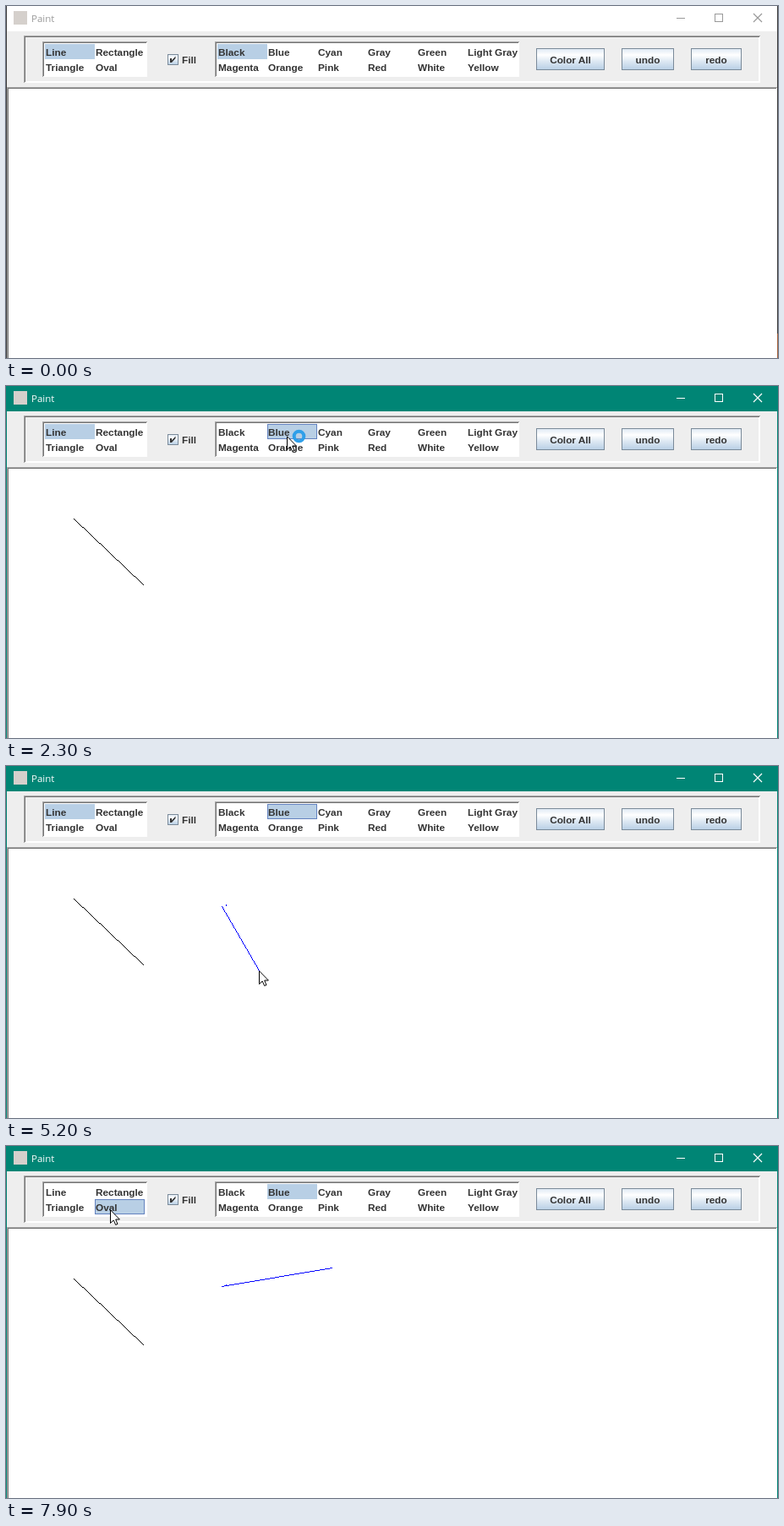
Write an HTML page that moves like this. It is 913 px wide and 417 px high and loops after 8 s.

```html
<!DOCTYPE html>
<html lang="en">
<head>
<meta charset="utf-8">
<title>Paint</title>
<style>
  html, body { margin: 0; width: 100%; height: 100%; overflow: hidden; background: #fff; }
  svg { display: block; width: 913px; height: 417px; --bar: #fff; --edge: #3c3c3c; --caption: #999; }
  svg.active { --bar: #008575; --edge: #008575; --caption: #fff; }
  #ui { font: bold 11.8px "Liberation Sans", Arial, sans-serif; fill: #333; }
  #title { font: 11.5px "Open Sans", sans-serif; fill: var(--caption); }
  .crisp { shape-rendering: crispEdges; }
  .mid { text-anchor: middle; }
</style>
</head>
<body>
<svg id="stage" viewBox="0 0 913 417">
  <defs>
    <linearGradient id="steel" x1="0" y1="0" x2="0" y2="1">
      <stop stop-color="#dde8f3"/>
      <stop offset=".3" stop-color="#fff"/>
      <stop offset=".6" stop-color="#dde8f3"/>
      <stop offset="1" stop-color="#b8cfe5"/>
    </linearGradient>
  </defs>

  <rect width="913" height="417" fill="#eee"/>
  <rect width="913" height="30" style="fill:var(--bar)"/>
  <rect x="9" y="6" width="16" height="16" fill="#d5d0cc"/>
  <text id="title" x="30" y="19">Paint</text>
  <g fill="none" style="stroke:var(--caption)">
    <path class="crisp" d="M793 14.5h10M838.5 9.5h9v9h-9z"/>
    <path stroke-width="1.2" d="M884 9l10 10m0-10l-10 10"/>
  </g>

  <g id="frames" class="crisp"></g>
  <path class="crisp" style="fill:var(--edge)" d="M0 0h1v417h-1zM912 0h1v417h-1z"/>
  <rect id="desk" x="912" y="388" width="1" height="29" fill="#a5623c"/>
  <g class="crisp" fill="#b8cfe5">
    <rect id="shapeSel" width="58" height="17"/>
    <rect id="colorSel" width="58" height="17"/>
  </g>
  <g id="ui"></g>
  <path d="M194 62v5h2l4.5-5v-2.5l-4.5 5v-2.5z" fill="#333"/>

  <g class="crisp">
    <path id="black"/>
    <path id="dot" fill="#00f"/>
    <path id="blue" fill="#00f"/>
  </g>
  <g id="cursor">
    <path d="M.5 .8V16.4L4.2 12.9 6.7 18.4 9 17.4 6.7 12H11.4Z" fill="#fff" stroke="#000"/>
    <circle id="busy" cx="14.5" cy=".5" r="5.8" fill="none" stroke="#2f9fe9" stroke-width="4"/>
  </g>
</svg>
<script>
const LOOP = 8000, STEP = 100;
const CELL_W = 59, CELL_H = 18;
const $ = id => document.getElementById(id);

const frames = $('frames'), ui = $('ui');
const add = (parent, markup) => parent.insertAdjacentHTML('beforeend', markup);
const label = (text, x, y, cls = '') => add(ui, `<text class="${cls}" x="${x}" y="${y}">${text}</text>`);

function bevel(x, y, w, h, fill) {
  const corner = (d, color) =>
    `<path fill="none" stroke="${color}" d="M${x + d + .5} ${y + h - d}V${y + d + .5}H${x + w - d}"/>`;
  add(frames, `<rect x="${x}" y="${y}" width="${w}" height="${h}" fill="#fff"/>
    <rect x="${x + 2}" y="${y + 2}" width="${w - 4}" height="${h - 4}" fill="${fill}"/>
    ${corner(0, '#a6a6a6')}${corner(1, '#747474')}`);
}

function list(x, y, rows) {
  bevel(x - 3, y - 3, rows[0].length * CELL_W + 6, rows.length * CELL_H + 6, '#fff');
  rows.forEach((row, r) => row.forEach((name, c) =>
    label(name, x + c * CELL_W + 1, y + r * CELL_H + 14)));
}

function steelBox(x, y, w, h) {
  add(frames, `<rect x="${x + .5}" y="${y + .5}" width="${w - 1}" height="${h - 1}" fill="url(#steel)" stroke="#7a8a99"/>`);
}

function button(text, x, w) {
  steelBox(x, 50, w, 26);
  label(text, x + w / 2, 68, 'mid');
}

bevel(21, 35, 871, 56, '#eee');
bevel(1, 96, 911, 330, '#fff');
list(46, 45, [['Line', 'Rectangle'], ['Triangle', 'Oval']]);
list(250, 45, [
  ['Black', 'Blue', 'Cyan', 'Gray', 'Green', 'Light Gray'],
  ['Magenta', 'Orange', 'Pink', 'Red', 'White', 'Yellow']
]);
steelBox(191, 57, 13, 13);
label('Fill', 208, 68);
button('Color All', 627, 81);
button('undo', 728, 62);
button('redo', 810, 60);

// Key points of the hand: time, x, y, rest
const route = [
  [200, 890, 390],
  [850, 80, 157],
  [1200, 162, 235, 100],
  [1400, 213, 194],
  [1900, 332, 59, 600],
  [2800, 260, 164, 100],
  [3100, 325, 203, 100],
  [3300, 260, 165, 100],
  [3700, 129, 67],
  [3900, 242, 145, 100],
  [4300, 264, 170, 300],
  [4900, 255, 166, 100],
  [5300, 330, 269],
  [5600, 414, 205],
  [5900, 311, 134],
  [6200, 383, 269, 100],
  [6450, 384, 284],
  [6800, 385, 151],
  [7000, 385, 144, 100],
  [7250, 374, 156],
  [7900, 123, 75, 100]
].flatMap(([t, x, y, rest]) => rest ? [[t, x, y], [t + rest, x, y]] : [[t, x, y]]);

// Smooth curve through the key points that never overshoots them
function slope(i, axis) {
  if (i < 1 || i > route.length - 2) return 0;
  const rate = j => (route[j + 1][axis] - route[j][axis]) / (route[j + 1][0] - route[j][0]);
  const a = rate(i - 1), b = rate(i);
  return a * b > 0 ? 2 * a * b / (a + b) : 0;
}

function pointerAt(t) {
  const next = route.findIndex(key => key[0] > t);
  const i = next < 0 ? route.length - 2 : Math.max(next - 1, 0);
  const span = route[i + 1][0] - route[i][0];
  const u = Math.min(Math.max((t - route[i][0]) / span, 0), 1), v = 1 - u;
  return [1, 2].map(axis => Math.round(
    v * v * (1 + 2 * u) * route[i][axis] + u * u * (1 + 2 * v) * route[i + 1][axis] +
    u * v * span * (v * slope(i, axis) - u * slope(i + 1, axis))));
}

// One-pixel line without smoothing
function pixelLine(x0, y0, x1, y1) {
  const n = Math.max(Math.abs(x1 - x0), Math.abs(y1 - y0)) || 1;
  let d = '';
  for (let i = 0; i <= n; i++) {
    d += `M${Math.round(x0 + (x1 - x0) * i / n)} ${Math.round(y0 + (y1 - y0) * i / n)}h1v1h-1z`;
  }
  return d;
}

function select(rect, x, y, focused) {
  rect.setAttribute('x', x + .5);
  rect.setAttribute('y', y + .5);
  rect.setAttribute('stroke', focused ? '#6382bf' : '#b8cfe5');
}

// A dragged line follows the pointer from press to release
function drag(id, t, press, release, x, y) {
  const end = pointerAt(Math.min(t, release));
  $(id).setAttribute('d', t < press ? '' : pixelLine(x, y, ...end));
}

const show = (el, on) => el.setAttribute('visibility', on ? 'visible' : 'hidden');

function render(t) {
  const [x, y] = pointerAt(t);
  const active = t >= 800, blue = t >= 2300, oval = t >= 7900;

  $('stage').classList.toggle('active', active);
  show($('desk'), !active);
  show($('cursor'), t >= 200);
  show($('busy'), t >= 200 && t < 3000);
  $('cursor').setAttribute('transform', `translate(${x} ${y})`);

  select($('shapeSel'), oval ? 105 : 46, oval ? 63 : 45, oval);
  select($('colorSel'), blue ? 309 : 250, 45, active && !oval);

  const lag = 40;
  drag('black', t, 900, 1200, 80, 157);
  drag('dot', t - lag, 2800 - lag, 3300, 260, 164);
  drag('blue', t, 4900, 7000, 255, 166);
}

function tick() {
  render(Math.floor(performance.now() % LOOP / STEP) * STEP);
  requestAnimationFrame(tick);
}
tick();
</script>
</body>
</html>
```
